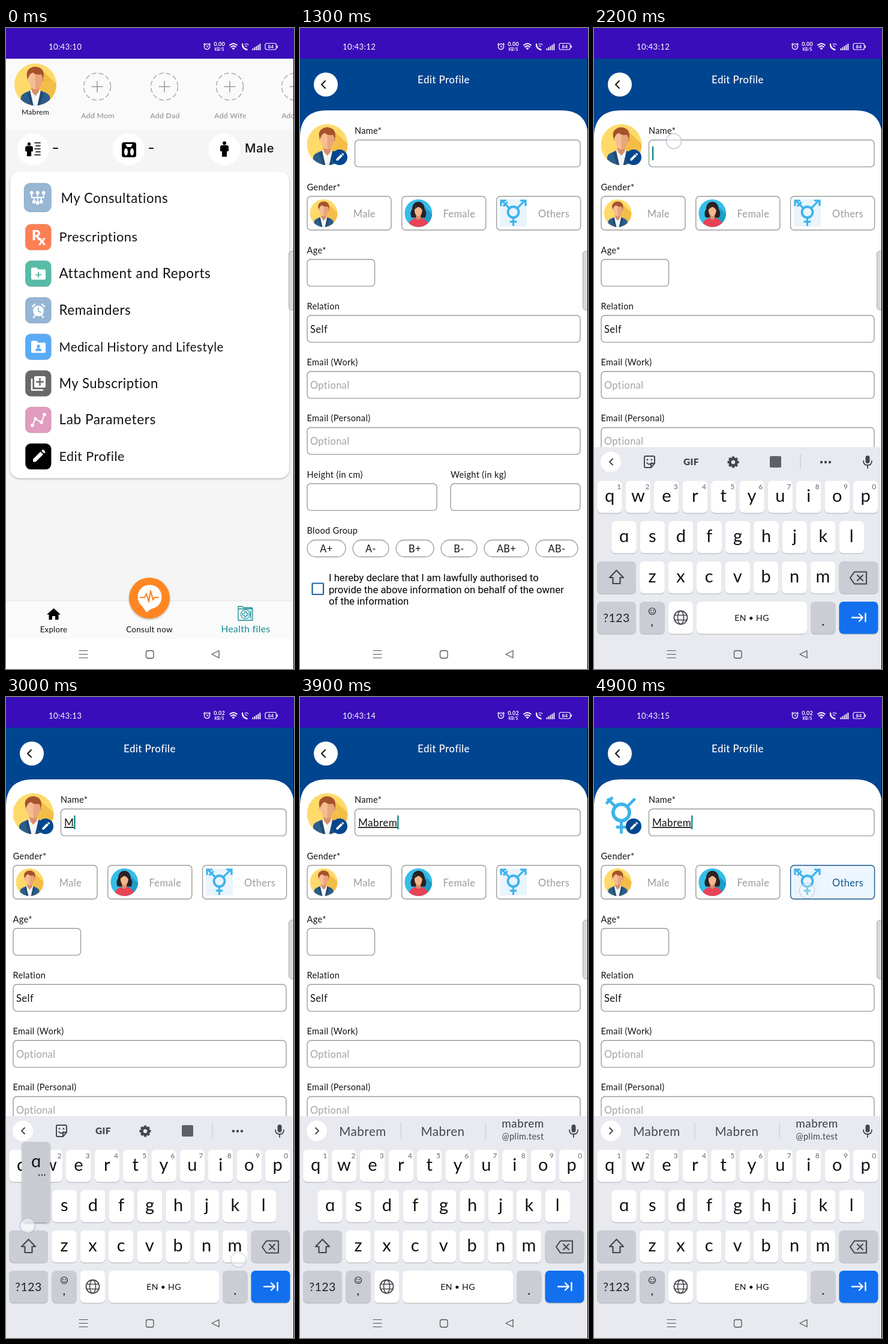
Write an HTML page that moves like this. It is 480x1066 px and loops after 5 s.

```html
<!DOCTYPE html>
<html lang="en">
<head>
<meta charset="utf-8">
<title>Edit profile</title>
<style>
html, body { margin: 0; width: 100%; height: 100%; overflow: hidden; background: #fff; }
svg { display: block; width: 100vw; height: 100vh; font-family: Lato, "Open Sans", sans-serif; }
text { letter-spacing: .025em; white-space: pre; }
.line { fill: none; stroke-linecap: round; stroke-linejoin: round; }
.opt rect { fill: #fff; stroke: #9c9c9c; stroke-width: 1.4; }
.opt text { fill: #9b9b9b; }
.opt.on rect { fill: #edf6fe; stroke: #14568f; }
.opt.on text { fill: #14568f; }
.upper { text-transform: uppercase; }
</style>
</head>
<body>
<svg id="stage" viewBox="0 0 480 1066"></svg>
<script>
const NAME = 'Mabrem', LOOP = 5000, STEP = 100;

// Drawing helpers
const rect = (x, y, w, h, r, fill, more = '') =>
  `<rect x="${x}" y="${y}" width="${w}" height="${h}" rx="${r}" fill="${fill}" ${more}/>`;
const disc = (x, y, r, fill, more = '') => `<circle cx="${x}" cy="${y}" r="${r}" fill="${fill}" ${more}/>`;
const shape = (d, fill, more = '') => `<path d="${d}" fill="${fill}" ${more}/>`;
const line = (d, color, w, more = '') =>
  `<path class="line" d="${d}" stroke="${color}" stroke-width="${w}" ${more}/>`;
const text = (x, y, s, size, fill = '#111', more = '') =>
  `<text x="${x}" y="${y}" font-size="${size}" fill="${fill}" ${more}>${s}</text>`;
const mid = (x, y, s, size, fill, more = '') => text(x, y, s, size, fill, 'text-anchor="middle" ' + more);
const at = (x, y, body, scale = 1) => `<g transform="translate(${x} ${y}) scale(${scale})">${body}</g>`;
const group = (id, body, more = '') => `<g id="${id}" ${more}>${body}</g>`;
const face = (use, x, y, r) => `<g transform="translate(${x} ${y}) scale(${r / 35})" clip-path="url(#disc)">${use}</g>`;

const pencil = color => shape('M-9 9v-4.5L3.5-8 8-3.5-4.5 9zM5-9.5l1.5-1.5q1-1 2 0l2.5 2.5q1 1 0 2L9.500-5z', color);
const folder = color => shape('M-12-8q0-2 2-2h7l3 3h10q2 0 2 2V8q0 2-2 2h-20q-2 0-2-2z', color);
const alarm = (color, hands) => disc(0, 1, 9, color) + line('M-10-6l4-4M10-6l-4-4M-6 9l-2 3M6 9l2 3', color, 2.6)
  + line('M0-4V1.500l4 2', hands, 1.8);

// People and the third gender sign, in a box of 70 around 0
const man = rect(-35, -35, 70, 70, 0, '#ffda6b')
  + shape('M12-23L36 0V36H0L-10 10z', '#f4bd48')
  + shape('M-26 36L-24 20Q-23 15-8 10H8Q23 15 24 20L26 36z', '#2b5d8c')
  + shape('M-9 9H9L5 36H-5z', '#f3f6f8') + shape('M-9 10l-5 5 7 21h4zM9 10l5 5-7 21H3z', '#214a72')
  + shape('M-6 2H6V12L0 19-6 12z', '#d98f68')
  + shape('M-11-14Q-11-24 0-24T11-14Q11 7 0 8-11 7-11-14z', '#f6bd93') + shape('M0-24Q11-24 11-14 11 7 0 8z', '#e9a57c')
  + disc(-12, -8, 2.5, '#f6bd93') + disc(12, -8, 2.5, '#e09a72')
  + shape('M-13-9Q-17-22-9-27-2-32 7-28 16-24 13-9L10-17Q0-15-4-20-9-18-10-15z', '#a4532b');
const woman = rect(-35, -35, 70, 70, 0, '#35bde8')
  + shape('M12-20L36 4V36H4z', '#1f9cc7')
  + shape('M-17 11Q-23 0-16-10-15-28 0-29 15-28 16-10 23 0 17 11z', '#2b2023')
  + shape('M-27 36Q-26 17-8 12H8Q26 17 27 36z', '#e84356')
  + shape('M-6 3H6V12Q0 22-6 12z', '#d98f68')
  + shape('M-10-10Q-10-20 0-20T10-10Q10 6 0 8-10 6-10-10z', '#f2b58c')
  + shape('M-11-8Q-9-22 2-21 12-20 11-6 8-13 1-16-5-15-11-8z', '#2b2023');
const sign = `<circle cy="-2" r="14" fill="none" stroke="#3db3ea" stroke-width="6"/>`
  + `<path d="M10-12L29-31M18-32H32V-18M-10-12L-29-31M-18-32H-32V-18M-26-17L-15-28M0 12V34M-9 23H9" `
  + `fill="none" stroke="#3db3ea" stroke-width="5"/>`;

const defs = `<defs><clipPath id="disc"><circle r="35"/></clipPath>
  <filter id="soft" x="-10%" y="-10%" width="120%" height="120%">
    <feDropShadow dx="0" dy="1.500" stdDeviation="1.600" flood-opacity=".3"/></filter>
  <g id="man">${man}</g><g id="woman">${woman}</g><g id="sign">${sign}</g></defs>`;

function statusBar() {
  const bars = [0, 1, 2, 3, 4].map(i => rect(410.5 + i * 3, 34 - i * 2, 1.8, 3 + i * 2, 0, '#fff')).join('');
  return rect(0, 0, 480, 51, 0, '#390db9')
    + text(71, 35.5, '', 13.2, '#fff', 'id="clock"')
    + at(335, 31, `<circle r="4.600" fill="none" stroke="#fff" stroke-width="1.300"/>`
      + line('M0-2V.5H2M-5.500-3.500l2-2M5.500-3.500l-2-2', '#fff', 1.2))
    + mid(355.5, 30, '', 9, '#fff', 'id="speed" font-weight="700"')
    + mid(355.5, 38, 'KB/S', 6.5, '#fff', 'font-weight="700"')
    + line('M373 28.500q6-5 12 0M375 31.500q4-3.500 8 0', '#fff', 1.7) + shape('M376.500 33.500q2.500-2 5 0L379 36.500z', '#fff')
    + line('M394 27q0 7 7.500 9', '#fff', 2.4) + line('M398 27q4-2 6 1M398.500 30q2-1 3 1', '#fff', 1.1)
    + bars + rect(432, 25.5, 18.5, 10.5, 3, 'none', 'stroke="#fff" stroke-width="1.200"')
    + rect(451.5, 29, 1.5, 4, .5, '#fff') + mid(441.4, 33.7, '84', 8, '#fff', 'font-weight="700"');
}

function home() {
  const adds = ['Mom', 'Dad', 'Wife', 'Son'].map((who, i) => {
    const x = [152, 264, 373, 482][i];
    return disc(x, 97.5, 22.5, 'none', 'stroke="#aaa" stroke-width="1.500" stroke-dasharray="8 4"')
      + line(`M${x - 9} 97.500h18M${x} 88.500v18`, '#999', 1.5) + mid(x + 1, 150, 'Add ' + who, 12.3, '#888');
  }).join('');

  const person = shape('M-4-7h8q3 0 3 3v7h-3v9h-8V3h-3v-7q0-3 3-3z', '#000') + disc(0, -10.5, 3, '#000');
  const stats = [45, 204.5, 364].map(x => disc(x, 202, 26.5, '#fff')).join('')
    + at(38.5, 202.5, person, .9) + line('M48 191h9M50 196h7M48 201h9M50 206h7M48 211h9', '#000', 1.7)
    + rect(193, 190, 24, 25, 4, '#000') + shape('M199 193h12l-3 5h-6z', '#fff')
    + `<ellipse cx="200" cy="206" rx="3" ry="6" fill="#fff"/><ellipse cx="210" cy="206" rx="3" ry="6" fill="#fff"/>`
    + at(364, 202, person) + line('M79 200h7M239 200h6', '#111', 2)
    + text(398, 207, 'Male', 20.3, '#111', 'font-family="Inter, sans-serif" font-weight="500"');

  const W = '#fff';
  const rows = [
    ['My Consultations', 22.1, '#98b7d2', line('M-10-6V0H10V-6M0-6V7M-6 0V6M6 0V6', W, 1.8)
      + [[-10, -8], [0, -8], [10, -8], [-6, 7], [0, 9], [6, 7]].map(p => disc(...p, 2.9, W)).join('')],
    ['Prescriptions', 21.8, '#fd7f56', text(-11, 5, 'R', 23, W, 'font-weight="900"') + text(0, 13, 'x', 22, W, 'font-weight="900"')],
    ['Attachment and Reports', 22.5, '#57bba8', folder(W) + line('M0-2V6M-4 2H4', '#57bba8', 2)],
    ['Remainders', 22.3, '#94b5d5', alarm(W, '#94b5d5')],
    ['Medical History and Lifestyle', 20.4, '#5aabf7', folder(W) + disc(0, -1, 2.6, '#5aabf7') + shape('M-5 7q0-5 5-5t5 5z', '#5aabf7')],
    ['My Subscription', 22.1, '#686868', rect(-7, -12, 19, 19, 2, W) + line('M-11-7V11H7', W, 2.5) + line('M2.500-8V3M-3-2.500H8', '#686868', 2.4)],
    ['Lab Parameters', 22.6, '#e19cbf', line('M-10 9L-5-2 5 4 10-9', W, 2)
      + [[-10, 9], [-5, -2], [5, 4], [10, -9]].map(p => disc(...p, 2.8, W)).join('')],
    ['Edit Profile', 21.4, '#000', pencil(W)]
  ].map(([label, size, color, icon], i) => {
    const y = i ? 287 + i * 60.8 : 282;
    const box = i ? rect(32.3, y - 21.5, 43, 43, 9, color, 'stroke="#0002"') : rect(30, 258, 45.5, 48, 10, color, 'stroke="#0002"');
    return box + at(i ? 54 : 52.7, y, icon) + text(i ? 88.5 : 91.5, y + (i ? 7.5 : 8.5), label, size, '#111');
  }).join('');

  const teal = '#0e8a94';
  const tabs = rect(0, 952, 480, 64, 0, '#fafafa') + rect(0, 952, 480, 1, 0, '#e6e6e6')
    + shape('M79.500 965L91 975.500H87.500V984H82V978H77V984H71.500V975.500H68z', '#000') + mid(79.5, 1004.5, 'Explore', 13.1)
    + disc(239, 948, 34, '#ff8623', 'filter="url(#soft)"') + disc(239.5, 946, 20, W) + shape('M227 961L234 972 246 963z', W)
    + line('M224 947h7l3-6 4 13 3-18 4 15 2-4h7', '#ff8623', 2.2) + mid(239, 1004.5, 'Consult now', 13.4)
    + line('M387 962h7l2 2h14v2M387 962V985h24V966H387M408 969v13', teal, 1.3)
    + disc(399, 975, 7.5, 'none', `stroke="${teal}" stroke-width="1.200"`)
    + line('M397.500 970.500h3v3h3v3h-3v3h-3v-3h-3v-3h3z', teal, 1.1) + mid(399.5, 1004.5, 'Health files', 15.6, teal);

  return rect(0, 51, 480, 965, 0, '#f5f5f5') + rect(0, 51, 480, 118.5, 0, '#fafafa')
    + face('<use href="#man"/>', 49, 94, 35) + mid(49, 144, NAME, 12.1) + adds + stats
    + rect(7, 238.5, 465, 510, 16, '#fff', 'filter="url(#soft)"') + rows + tabs;
}

function profile() {
  const field = (x, y, w) => rect(x, y, w, 44.6, 6, '#fff', 'stroke="#9c9c9c" stroke-width="1.400"');
  const label = (x, y, s) => text(x, y, s, 14.5);
  const options = ['Male', 'Female', 'Others'].map((s, i) => {
    const x = 12 + i * 157.8;
    const pic = i < 2 ? face(`<use href="#${['man', 'woman'][i]}"/>`, x + 27.5, 308, 23)
      : shape('M333 285h45v45h-45z', '#e9f4fd') + at(355.5, 307.5, '<use href="#sign"/>', .64);
    return `<g class="opt">${rect(x, 280, 140, 56, 6, '#fff')}${pic}${mid(x + 95.5, 314.5, s, 16.4, '')}</g>`;
  }).join('');
  const pills = [['A+', 12, 64], ['A-', 88, 60], ['B+', 160, 63], ['B-', 235, 60], ['AB+', 307, 74], ['AB-', 393, 70]]
    .map(([s, x, w]) => rect(x, 851.500, w, 28, 14, '#fff', 'stroke="#9c9c9c" stroke-width="1.300"') + mid(x + w / 2, 871.5, s, 16.3)).join('');
  const terms = ['I hereby declare that I am lawfully authorised to', 'provide the above information on behalf of the owner', 'of the information']
    .map((s, i) => text(48, 920 + i * 19.6, s, 16.7, '#000', 'font-family="Roboto, sans-serif" style="letter-spacing:0"')).join('');

  return rect(0, 51, 480, 965, 0, '#00458f') + shape('M0 1016V182Q0 137 45 137H435Q480 137 480 182V1016z', '#fff')
    + disc(43, 94, 20, '#fff') + line('M42 88l-6 6 6 6', '#111', 2) + mid(239.5, 92, 'Edit Profile', 16.9, '#fff', 'font-weight="500"')
    + face('<use id="avatar" href="#man"/>', 45.5, 194, 34) + disc(66, 215, 13, '#00478f') + at(66, 215, pencil('#fff'), .62)
    + label(91, 175.5, 'Name*') + field(91.5, 186.3, 375.5)
    + text(97, 215, '', 17.1, '#111', 'id="name" text-decoration="underline"') + rect(97, 197, 2.2, 23, 0, '#00857c', 'id="cursor"')
    + label(11.5, 269.5, 'Gender*') + options
    + label(11.5, 374.5, 'Age*') + field(12, 384.8, 112.5)
    + label(11.5, 467.5, 'Relation') + field(12, 478, 455) + text(17, 507, 'Self', 16.6)
    + label(11.5, 561, 'Email (Work)') + field(12, 571.3, 455) + text(17, 600, 'Optional', 16.4, '#a3a3a3')
    + label(11.5, 654, 'Email (Personal)') + field(12, 664.5, 455) + text(17, 693, 'Optional', 16.4, '#a3a3a3')
    + label(11.5, 747.5, 'Height (in cm)') + field(12, 757.8, 216)
    + label(251, 747.5, 'Weight (in kg)') + field(251, 757.8, 216)
    + label(11.5, 840.5, 'Blood Group') + pills
    + rect(20.5, 923.5, 18.5, 18.5, 1, '#fff', 'stroke="#1d65a0" stroke-width="2.200"') + terms;
}

// Keyboard
const keyAt = {};
['qwertyuiop', 'asdfghjkl', 'zxcvbnm'].forEach((row, r) =>
  [...row].forEach((c, i) => keyAt[c] = [[26, 50, 97][r] + i * 47.4, 780 + r * 67]));
const glyph = c => c === 'a' ? 'ɑ' : c;
const keyText = (x, y, c) => mid(x, y + 8, glyph(c), 29, '#111', 'font-family="Lato, Noto Sans, sans-serif" style="letter-spacing:0"');

function keyboard() {
  const ink = '#45474d', grey = '#cbcdd4';
  const key = (x, y, w, fill = '#fff') => rect(x, y + 1.2, w, 53.5, 7, '#b9bbc2') + rect(x, y, w, 53.5, 7, fill);
  const chars = Object.entries(keyAt);
  const caps = chars.map(([, [x, y]]) => key(x - 20.8, y - 27, 41.6)).join('');
  const letters = chars.map(([c, [x, y]]) => keyText(x, y, c)).join('');
  const digits = [...'1234567890'].map((d, i) => mid(42 + i * 47.2, 767, d, 12, '#666')).join('');
  const teeth = [0, 45, 90, 135].map(a => rect(-2.2, -9.5, 4.4, 19, 1, ink, `transform="rotate(${a})"`)).join('');

  const tools = line('M31 716.500l-5 5 5 5', ink, 2)
    + line('M84 714q0-2 2-2h13q2 0 2 2v10l-6 7h-9q-2 0-2-2zM101 724h-4q-2 0-2 2v5M88 723q4 5 8 0', ink, 2) + disc(89, 718, 1.4, ink) + disc(96, 718, 1.4, ink)
    + mid(162, 727, 'GIF', 15.5, ink, 'font-weight="900"')
    + at(232, 722, teeth + disc(0, 0, 7.5, ink) + disc(0, 0, 3.2, '#e8eaf0'))
    + rect(293, 712, 19, 19, 2, '#5d6067') + rect(343.5, 709, 1, 25, 0, '#c3c5cb')
    + [379, 386, 393].map(x => disc(x, 722, 2.2, ink)).join('');
  const hints = line('M26 716.500l5 5-5 5', ink, 2) + rect(167.5, 708, 1, 27, 0, '#c3c5cb') + rect(308.5, 708, 1, 27, 0, '#c3c5cb')
    + mid(104.5, 729.5, '', 20.6, ink, 'class="hint"') + mid(238, 729.5, '', 20.6, ink, 'class="hint"')
    + mid(371.5, 716, '', 18.8, ink, 'class="hint" font-weight="500"') + mid(371.5, 736, '@plim.test', 14.4, ink);

  return rect(0, 697, 480, 369, 0, '#e8eaf0') + disc(28, 721.5, 17, '#fff') + group('tools', tools) + group('hints', hints)
    + rect(452.500, 711, 7, 13, 3.5, ink) + line('M449 720q0 7 7 7t7-7M456 727v5', ink, 1.8)
    + caps + digits + group('letters', letters)
    + key(5, 887, 65, grey) + line('M37.500 902L49 914H43.500V924H31.500V914H26z', ink, 2.2)
    + key(408.5, 887, 65, grey) + line('M434 904.500H454V924.500H434L427 914.500zM439 910l9 9M448 910l-9 9', ink, 2.1)
    + key(5, 954, 65, grey) + mid(37.5, 987.5, '?123', 19.5, '#222')
    + key(76.2, 954, 41.6, grey) + disc(97, 970, 5.5, 'none', 'stroke="#222" stroke-width="1.200"')
    + disc(95, 968.5, .9, '#222') + disc(99, 968.5, .9, '#222') + line('M94 971.500q3 3 6 0', '#222', 1) + mid(97, 994, ',', 20)
    + key(123.6, 954, 41.6) + at(144.5, 980.5, disc(0, 0, 11, 'none', `stroke="${ink}" stroke-width="1.800"`)
      + `<ellipse rx="5" ry="11" fill="none" stroke="${ink}" stroke-width="1.600"/>` + line('M-10-4H10M-10 4H10', ink, 1.6))
    + key(171, 954, 184) + mid(263, 986, 'EN • HG', 14) + key(361, 954, 41.6, grey) + mid(382, 994, '.', 21)
    + key(408.5, 954, 65, '#1270ee') + line('M430 980.500h17M442 974.500l6 6-6 6M452.500 974v13', '#fff', 2.3);
}

const nav = rect(0, 1016, 480, 50, 0, '#fff', 'id="navBg"')
  + line('M122 1035.500h14M122 1041.500h14M122 1047.500h14', '#555', 1.2)
  + rect(233.5, 1035.5, 12.5, 12.5, 3, 'none', 'stroke="#555" stroke-width="1.300"') + line('M355 1035.500v12l-12-6z', '#555', 1.3);

const stage = document.getElementById('stage');
stage.innerHTML = defs + group('home', home()) + group('profile', profile()) + group('keyboard', keyboard())
  + nav + group('popup', '') + statusBar()
  + rect(471.5, 371, 14, 98, 5, '#d9d9d9', 'stroke="#a8a8a8"') + rect(479, 51, 1, 1015, 0, '#000') + group('touches', '');
const $ = id => document.getElementById(id);
const options = [...stage.querySelectorAll('.opt')], hints = [...stage.querySelectorAll('.hint')];

// Key presses: letter, down, up, finger offset from the key centre
const presses = [['M', 2700, 2900, 6, 22], ['a', 2900, 3200, -14, 32], ['b', 3300, 3400, 2, 22],
  ['r', 3400, 3500, -4, 24], ['e', 3500, 3600, -4, 24], ['m', 3600, 3700, 4, 22]];
// Finger marks: x, y, from, to
const touches = [[135, 720, 800, 1200], [133, 188, 1800, 2400], [60, 324, 4300, 4500], [215, 324, 4500, 4700], [355, 322, 4700, 5000],
  ...presses.map(([c, down, up, dx, dy]) => {
    const [x, y] = keyAt[c.toLowerCase()];
    return [x + dx, y + dy, down, up + 200];
  })];
const clockTicks = [300, 1300, 2400, 3400, 4400], picks = [4400, 4600, 4900];
const passed = (times, t) => times.filter(s => t >= s).length;
const within = (t, a, b) => t >= a && t < b;
const clamp = v => Math.max(0, Math.min(1, v));
const show = (id, on) => $(id).setAttribute('display', on ? 'inline' : 'none');

function draw(t) {
  $('clock').textContent = '10:43:' + (10 + passed(clockTicks, t));
  $('speed').textContent = t < 2400 ? '0.00' : '0.02';

  const slide = 480 * (1 - clamp((t - 1100) / 200)) ** 2;
  $('profile').setAttribute('transform', `translate(${slide} 0)`);
  const rise = 320 * (1 - clamp((t - 2000) / 200));
  show('keyboard', rise < 320);
  $('keyboard').setAttribute('transform', `translate(0 ${rise})`);
  $('navBg').setAttribute('fill', rise < 320 ? '#e8eaf0' : '#fff');

  const typed = NAME.slice(0, passed(presses.map(p => p[2]), t));
  $('name').textContent = typed;
  $('cursor').setAttribute('x', 97 + (typed ? $('name').getComputedTextLength() : 0));
  show('cursor', within(t, 1900, 2500) || within(t, 2900, 4100) || t >= 4600);
  const hinting = t >= 3300;
  show('tools', !hinting);
  show('hints', hinting);
  [typed, typed.slice(0, -1) + 'n', typed.toLowerCase()].forEach((s, i) => hints[i].textContent = s);
  $('letters').setAttribute('class', within(t, 2700, 2900) ? 'upper' : '');

  $('popup').innerHTML = presses.filter(p => within(t, p[1], p[2])).map(([c]) => {
    const [x, y] = keyAt[c.toLowerCase()];
    return rect(x - 23.5, y - 107, 47, 134, 6, '#c9cbd2', 'filter="url(#soft)"') + keyText(x, y - 73, c) + mid(x + 10, y - 51, '...', 18);
  }).join('');

  const pick = passed(picks, t) - 1;
  options.forEach((o, i) => o.classList.toggle('on', i === pick));
  $('avatar').setAttribute('href', ['#man', '#woman', '#sign'][Math.max(0, pick)]);

  $('touches').innerHTML = touches.filter(([, , a, b]) => within(t, a, b)).map(([x, y, , end]) =>
    disc(x, y, 12.5, '#fff9', `stroke="#b9b9dc" stroke-width="1.500" opacity="${end - t > STEP ? .85 : .55}"`)).join('');
}

let start, last;
function frame(now) {
  start ??= now;
  const t = Math.floor((now - start) % LOOP / STEP) * STEP;
  if (t !== last) draw(last = t);
  requestAnimationFrame(frame);
}
draw(0);
requestAnimationFrame(frame);
</script>
</body>
</html>
```
